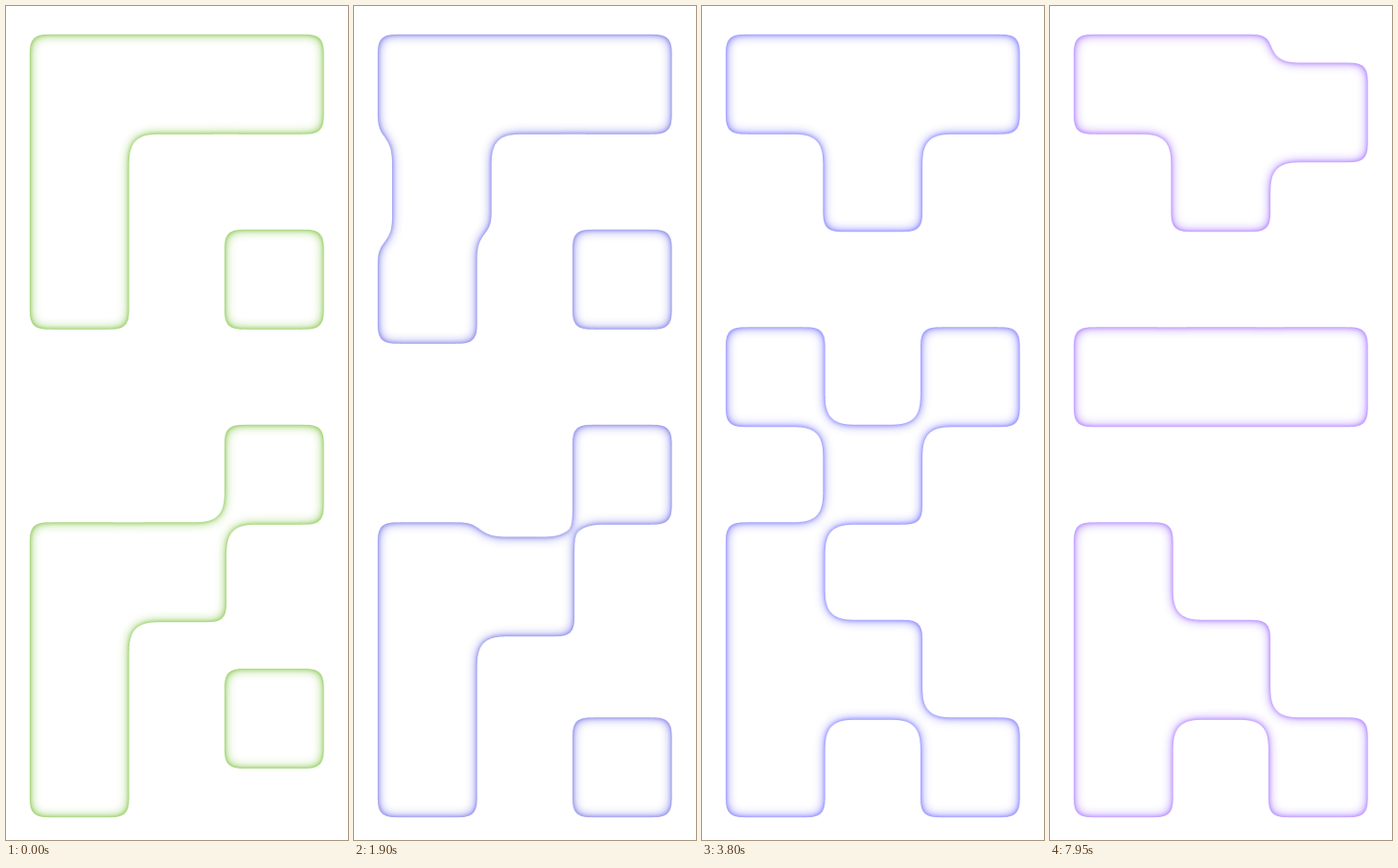
Animation, 360 px wide and 876 px high, one loop 8000 ms. Source, as an HTML page:

```html
<!DOCTYPE html>
<html lang="en">
<head>
<meta charset="utf-8">
<title>Gooey tiles</title>
<style>
  html, body { margin: 0; width: 100%; height: 100%; overflow: hidden; background: #fff; }
  svg { display: block; width: 100%; height: 100%; }
</style>
</head>
<body>
<svg viewBox="0 0 360 876">
  <defs>
    <filter id="goo" filterUnits="userSpaceOnUse" x="0" y="0" width="360" height="876" color-interpolation-filters="sRGB">
      <!-- Blur and cut high: tight outer corners, wider inner ones -->
      <feGaussianBlur in="SourceGraphic" stdDeviation="10"/>
      <feComponentTransfer result="shape">
        <feFuncA type="linear" slope="36" intercept="-28.3"/>
      </feComponentTransfer>
      <feComponentTransfer in="shape" result="outside">
        <feFuncA type="table" tableValues="1 0"/>
      </feComponentTransfer>
      <feGaussianBlur in="outside" stdDeviation="6" result="wide"/>
      <feGaussianBlur in="outside" stdDeviation="2" result="thin"/>
      <feFlood id="tint" result="tint"/>
      <feComposite in="tint" in2="wide" operator="in" result="glow"/>
      <feComposite in="tint" in2="thin" operator="in" result="rim"/>
      <feMerge result="light">
        <feMergeNode in="glow"/>
        <feMergeNode in="rim"/>
      </feMerge>
      <feComposite in="light" in2="shape" operator="in"/>
    </filter>
  </defs>
  <g id="tiles" filter="url(#goo)"></g>
</svg>
<script>
const LOOP = 8000, STEP = 50, BEAT = 1000, FIRST = -300, MOVE = 600;
const PITCH = 102.5, SIZE = 104.5, PAD = 8.4, LEFT = 25, TOP = 30;

const layout = ['###', '#..', '#.#', '...', '..#', '##.', '#.#', '#..'];
// Moves on each beat: column, row, direction
const beats = ['26v', '', '01> 02v 15v', '22v 24<', '', '', '', '14^', '20v'];
const dirs = { '>': [1, 0], '<': [-1, 0], 'v': [0, 1], '^': [0, -1] };

const group = document.getElementById('tiles');
const tint = document.getElementById('tint');
const clamp = u => Math.min(1, Math.max(0, u));
const lerp = (a, b, u) => a + (b - a) * u;
const easeInOut = u => u < 0.5 ? 4 * u ** 3 : 1 - 4 * (1 - u) ** 3;
const easeOut = u => 1 - (1 - u) ** 3;

function addTile(col, row) {
  const rect = document.createElementNS('http://www.w3.org/2000/svg', 'rect');
  rect.setAttribute('width', SIZE + 2 * PAD);
  rect.setAttribute('height', SIZE + 2 * PAD);
  rect.setAttribute('rx', 12);
  group.appendChild(rect);
  return { rect, col, row, cell: `${col}${row}`, moves: [] };
}

const tiles = layout.flatMap((line, row) =>
  [...line].flatMap((mark, col) => mark === '#' ? addTile(col, row) : []));

beats.forEach((list, i) => {
  for (const [col, row, dir] of list.split(' ').filter(Boolean)) {
    const tile = tiles.find(t => t.cell === col + row);
    const [dx, dy] = dirs[dir];
    tile.moves.push({ start: FIRST + i * BEAT, dx, dy });
    tile.cell = `${+col + dx}${+row + dy}`;
  }
});

function place(tile, t) {
  let { col, row } = tile;
  for (const { start, dx, dy } of tile.moves) {
    const u = easeInOut(clamp((t - start) / MOVE));
    col += dx * u;
    row += dy * u;
  }
  tile.rect.setAttribute('x', LEFT - PAD + col * PITCH);
  tile.rect.setAttribute('y', TOP - PAD + row * PITCH);
}

// Green turns to periwinkle, later to violet
function colour(t) {
  const u = clamp(t / 2400), v = clamp((t - 5000) / 1600);
  const hue = lerp(92, 242, easeOut(u)) + 20 * v;
  return `hsl(${hue}, ${lerp(52, 100, u ** 4)}%, ${lerp(56, 75, u)}%)`;
}

function draw(t) {
  tiles.forEach(tile => place(tile, t));
  tint.setAttribute('flood-color', colour(t));
}

function tick() {
  const t = performance.now() % LOOP;
  draw(Math.floor(t / STEP) * STEP);
  requestAnimationFrame(tick);
}
tick();
</script>
</body>
</html>
```
